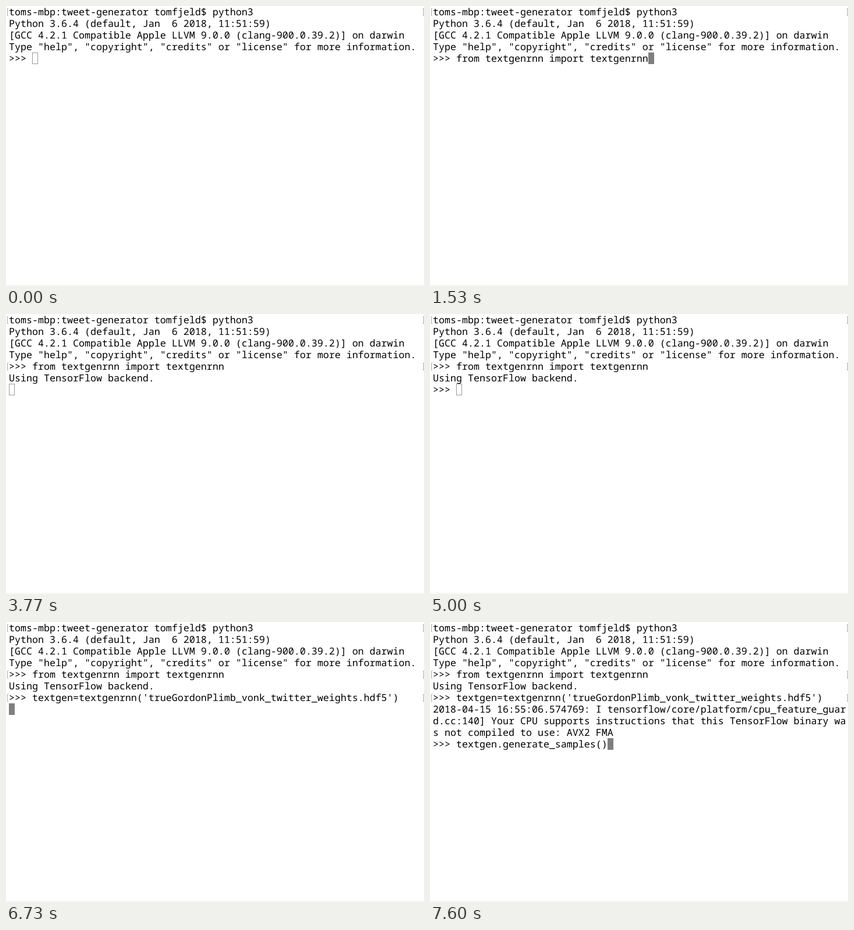
An HTML page for the animation above (8 s loop, 718 by 482 pixels).

```html
<!DOCTYPE html>
<html lang="en">
<head>
<meta charset="utf-8">
<title>Terminal session</title>
<style>
  html, body { margin: 0; width: 100%; height: 100%; overflow: hidden; background: #fff; }
  svg { display: block; width: 718px; height: 482px; }
  text {
    font: 16.667px "Noto Sans Mono", "DejaVu Sans Mono", monospace;
    white-space: pre;
    text-rendering: geometricPrecision;
  }
  .mark { fill: none; stroke: #a8a8a8; }
</style>
</head>
<body>
<svg viewBox="0 0 718 482">
  <rect width="718" height="482" fill="#fff"/>
  <path d="M0 480.5H718" stroke="#f1f1f1"/>
  <g id="screen"></g>
  <rect id="cursor"/>
</svg>
<script>
const LOOP = 8000, COL = 10, ROW = 20, LEFT = 5;
const NS = "http://www.w3.org/2000/svg";
const screen = document.getElementById("screen");
const cursor = document.getElementById("cursor");

// Each line of the session: when it appears and, for input, when it is entered.
const lines = [
  { row: 0, at: 0, enter: 0, text: "toms-mbp:tweet-generator tomfjeld$ python3" },
  { row: 1, at: 0, text: "Python 3.6.4 (default, Jan  6 2018, 11:51:59)" },
  { row: 2, at: 0, text: "[GCC 4.2.1 Compatible Apple LLVM 9.0.0 (clang-900.0.39.2)] on darwin" },
  { row: 3, at: 0, text: 'Type "help", "copyright", "credits" or "license" for more information.' },
  { row: 4, at: 0, text: ">>>" },
  { row: 4, at: 1530, enter: 2470, text: "    from textgenrnn import textgenrnn" },
  { row: 5, at: 2930, text: "Using TensorFlow backend." },
  { row: 6, at: 5000, text: ">>>" },
  { row: 6, at: 6170, enter: 6730, text: "    textgen=textgenrnn('trueGordonPlimb_vonk_twitter_weights.hdf5')" },
  { row: 7, at: 6770, text: "2018-04-15 16:55:06.574769: I tensorflow/core/platform/cpu_feature_guar" },
  { row: 8, at: 6770, text: "d.cc:140] Your CPU supports instructions that this TensorFlow binary wa" },
  { row: 9, at: 6770, text: "s not compiled to use: AVX2 FMA" },
  { row: 10, at: 7170, text: ">>>" },
  { row: 10, at: 7600, text: "    textgen.generate_samples()" }
];

// Cursor states: start time, row, column, look.
const moves = [
  [0, 4, 4, "hollow"],
  [1070, 4, 4, "solid"],
  [1530, 4, 37, "solid"],
  [2470, 5, 0, "solid"],
  [2930, 6, 0, "solid"],
  [3670, 6, 0, "off"],
  [3770, 6, 0, "hollow"],
  [5000, 6, 4, "hollow"],
  [5970, 6, 4, "solid"],
  [6170, 6, 67, "solid"],
  [6730, 7, 0, "solid"],
  [6770, 10, 0, "solid"],
  [7170, 10, 4, "solid"],
  [7600, 10, 30, "solid"]
];

const looks = {
  solid: { fill: "#7f7f7f", stroke: "none", inset: 0 },
  hollow: { fill: "none", stroke: "#999", inset: 0.5 },
  off: { fill: "none", stroke: "none", inset: 0 }
};

function set(el, attrs) {
  for (const key in attrs) el.setAttribute(key, attrs[key]);
  return el;
}

function add(tag, attrs) {
  return screen.appendChild(set(document.createElementNS(NS, tag), attrs));
}

for (const line of lines) {
  const y = line.row * ROW;
  line.label = add("text", { x: LEFT, y: y + 16 });
  line.label.textContent = line.text;
  if ("enter" in line) {
    line.marks = add("path", {
      class: "mark",
      d: `M4 ${y + 4.5}H2.5V${y + 16.5}H4M716 ${y + 4.5}H717.5V${y + 16.5}H716`
    });
  }
}

function show(el, on) {
  el.setAttribute("visibility", on ? "visible" : "hidden");
}

function render(t) {
  for (const line of lines) {
    show(line.label, t >= line.at);
    if (line.marks) show(line.marks, t >= line.enter);
  }
  const [, row, col, name] = moves.findLast(move => t >= move[0]);
  const { fill, stroke, inset } = looks[name];
  set(cursor, {
    x: LEFT + col * COL + inset,
    y: row * ROW + inset,
    width: COL - 2 * inset,
    height: ROW - 2 * inset,
    fill, stroke
  });
}

const start = performance.now();
function tick() {
  render((performance.now() - start) % LOOP);
  requestAnimationFrame(tick);
}
tick();
</script>
</body>
</html>
```
